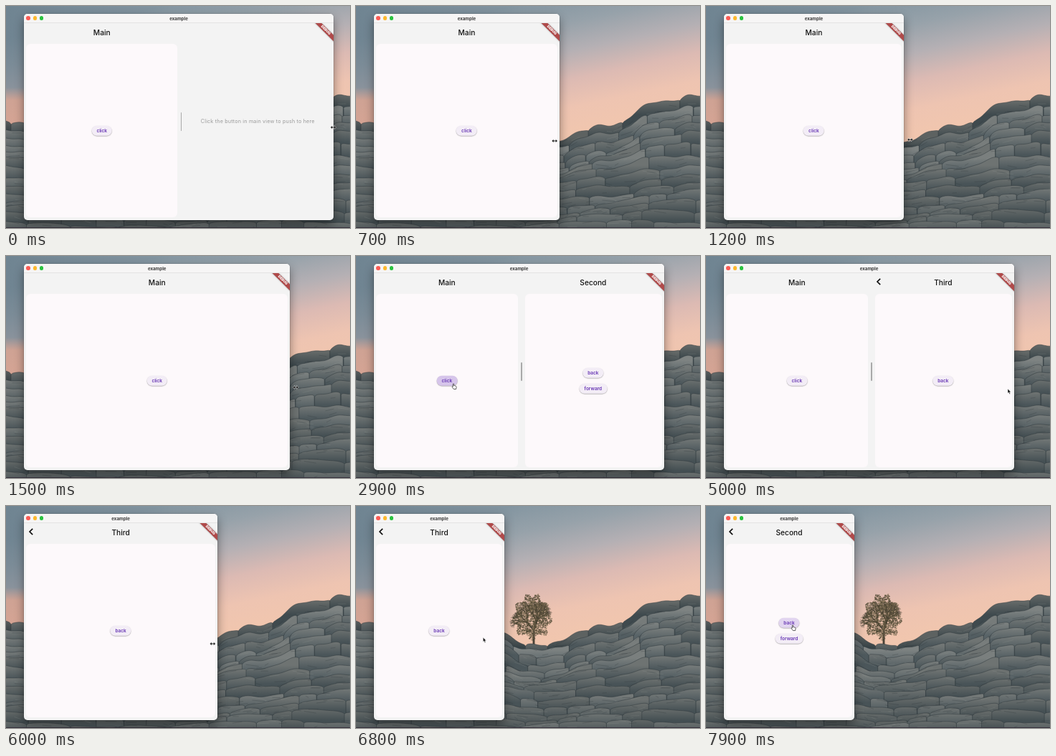
Write an HTML page with a canvas that moves like this. It is 480 px wide and 311 px high and loops after 8000 ms.

```html
<!DOCTYPE html>
<html lang="en">
<head>
<meta charset="utf-8">
<title>Split view</title>
<style>
html, body { margin: 0; width: 100%; height: 100%; overflow: hidden; background: #59646a; }
body { position: relative; font-family: Inter, Roboto, sans-serif; }
[hidden] { display: none !important; }
#scene { position: absolute; left: 0; top: 0; width: 480px; height: 311px; }
#win, #shade { position: absolute; left: 25px; top: 10.5px; height: 289px; border-radius: 5px; }
#win { overflow: hidden; background: #f3f3f3; }
#shade { box-shadow: 0 0 0 .5px rgba(0,0,0,.2), 0 6px 14px rgba(0,0,0,.42); }
#bar {
  position: absolute; left: 0; right: 0; top: 0; height: 12.5px; line-height: 13px;
  background: #f6f5f5; border-bottom: .5px solid #e4e3e3; text-align: center;
  font-size: 6.2px; font-weight: 700; color: #3b3b3b;
}
#bar i { position: absolute; top: 3.7px; width: 5.6px; height: 5.6px; border-radius: 50%; }
.pane { position: absolute; top: 0; bottom: 0; }
.title {
  position: absolute; left: 0; right: 0; top: 19px; line-height: 14px;
  text-align: center; font-size: 10.2px; font-weight: 500; color: #111;
}
.card { position: absolute; left: 3px; right: 3px; top: 42px; bottom: 3.5px; border-radius: 6px; background: #fdf9fb; }
.split #detail .card { left: 4px; }
.chevron { position: absolute; left: 5.6px; top: 20.5px; width: 8px; height: 10px; }
.btn {
  position: absolute; left: 50%; transform: translate(-50%, -50%); height: 14.4px; line-height: 14.4px;
  padding: 0 7px; border-radius: 7.2px; background: #f3edf6; color: #6634b3;
  font-size: 6.5px; font-weight: 600; white-space: nowrap;
  box-shadow: 0 .6px 1.2px rgba(0,0,0,.34);
}
.btn.hot { background: #e2d5f0; }
.btn.down { background: #d6c5ea; }
#hint {
  position: absolute; left: 0; right: 0; top: 145px; line-height: 12px; text-align: center;
  font-size: 7.2px; letter-spacing: .18px; color: #999; white-space: nowrap;
}
#grip { position: absolute; top: 138px; width: 1.7px; height: 26px; margin-left: -.8px; border-radius: 1px; background: #a9a9a9; }
#ribbon { position: absolute; right: 0; top: 13px; width: 28px; height: 28px; overflow: hidden; }
#ribbon b {
  position: absolute; left: -10.6px; top: 7.5px; width: 56px; height: 5.8px;
  line-height: 5.9px; text-align: center; font-size: 4.9px; font-weight: 900; color: #fff;
  background: #b04a4a; box-shadow: 0 0 2px rgba(0,0,0,.5); transform: rotate(45deg);
}
#cursor { position: absolute; left: 0; top: 0; width: 1px; height: 1px; overflow: visible; }
</style>
</head>
<body>
<canvas id="scene" width="480" height="311"></canvas>
<div id="shade"></div>
<div id="win">
  <div id="main" class="pane" style="left:0">
    <div class="title">Main</div>
    <div class="card"></div>
    <div id="click" class="btn" style="top:164px">click</div>
  </div>
  <div id="detail" class="pane" style="right:0">
    <div id="hint">Click the button in main view to push to here</div>
    <div id="page">
      <svg id="chevron" class="chevron" viewBox="0 0 8 10"><path d="M6.2.8 2 5l4.2 4.2" fill="none" stroke="#111" stroke-width="1.7"/></svg>
      <div id="name" class="title"></div>
      <div class="card"></div>
      <div id="back" class="btn">back</div>
      <div id="forward" class="btn" style="top:175px">forward</div>
    </div>
  </div>
  <div id="grip"></div>
  <div id="bar">
    <i style="left:3.4px;background:#fc5b55"></i><i style="left:12.6px;background:#fdb92d"></i><i style="left:21.7px;background:#29c23f"></i>
    example
  </div>
  <div id="ribbon"><b>DEBUG</b></div>
</div>
<svg id="cursor">
  <g id="resize" stroke="#fff" stroke-width=".5"><path d="M-4 0l2.6-2.5v1.7h2.8v-1.7L4 0 1.4 2.5V.8h-2.8v1.7z" fill="#111"/></g>
  <g id="arrow" stroke="#fff" stroke-width=".5"><path d="M0 0v6.3l1.4-1.2 1 2.3 1.2-.5-1-2.2h1.9z" fill="#111"/></g>
  <g id="hand" stroke="#111" stroke-width=".65" stroke-linejoin="round"><path d="M-.7 4V.6q0-.8.7-.8t.7.8v2l1 .1.9.3.9.4q.6.3.6 1L3.6 7.5H.4L-1.7 4.8q-.5-.8.2-1z" fill="#fff"/></g>
</svg>
<script>
const $ = id => document.getElementById(id);

function seeded(s) {
  return () => (s = (s * 16807) % 2147483647) / 2147483647;
}

// Eased progress from 0 to 1 between two times or places.
function ease(t, from, to) {
  const u = Math.min(1, Math.max(0, (t - from) / (to - from)));
  return (1 - Math.cos(Math.PI * u)) / 2;
}

function gradient(g, x0, y0, x1, y1, ...colors) {
  const fill = g.createLinearGradient(x0, y0, x1, y1);
  colors.forEach((color, i) => fill.addColorStop(i / (colors.length - 1), color));
  return fill;
}

// Skyline of the rock: a dip under the tree, a long climb, two domes.
function ridge(x) {
  return 162 + 8 * ease(x, 0, 50) + 25 * ease(x, 180, 245) - 27 * ease(x, 260, 345)
    - 33 * ease(x, 355, 420) - 9 * ease(x, 430, 468) + 1.2 * Math.sin(x / 5);
}

function drawTree(g, rnd) {
  g.strokeStyle = '#4a4236';
  (function branch(x, y, angle, len, depth) {
    const ex = x + Math.cos(angle) * len, ey = y + Math.sin(angle) * len;
    g.lineWidth = .4 + depth * .5;
    g.beginPath();
    g.moveTo(x, y);
    g.lineTo(ex, ey);
    g.stroke();
    if (!depth) return;
    for (const turn of [-.5, 0, .5])
      branch(ex, ey, angle + turn + (rnd() - .5) * .4, len * (.6 + rnd() * .18), depth - 1);
  })(248, 197, -1.57, 23, 5);
  for (let i = 0; i < 1900; i++) {
    const a = rnd() * 6.283, r = Math.sqrt(rnd()) * (1 + .12 * Math.sin(a * 9));
    g.fillStyle = rnd() < .62 ? 'rgba(78,71,53,.75)' : 'rgba(140,122,92,.6)';
    g.fillRect(245 + Math.cos(a) * r * (25 + 4 * Math.sin(a)), 154 + Math.sin(a) * r * 30, 1.5, 1.3);
  }
}

function drawRock(g, rnd) {
  const layers = 14;
  const level = (k, x) => {
    const top = ridge(x), sag = Math.sin(x / 61 + k * .9) * 4 + Math.sin(x / 17 + k * 2) * 1.2;
    return top + (316 - top) * k / layers + sag * Math.min(k, 3) / 3;
  };
  for (let k = 0; k < layers; k++) {
    for (let x = -30 * rnd(); x < 480;) {
      const end = x + 24 + rnd() * 56, top = level(k, (x + end) / 2);
      const tone = Math.round((k ? 112 : 90) + rnd() * 16 - k * 1.2);
      g.beginPath();
      g.moveTo(x, 311);
      for (let px = x; px <= end + 1; px += 2) {
        const bulge = Math.sqrt(Math.max(0, 1 - Math.abs((px - x) / (end - x) * 2 - 1) ** 4));
        g.lineTo(px, level(k, px) + 2.5 - 3.5 * bulge);
      }
      g.lineTo(end + 1, 311);
      g.fillStyle = gradient(g, 0, top - 2, 0, top + 15,
        `rgb(${tone},${tone + 5},${tone + 4})`, `rgb(${tone - 36},${tone - 25},${tone - 21})`);
      g.fill();
      g.lineWidth = .9;
      g.strokeStyle = 'rgba(44,52,56,.5)';
      g.stroke();
      x = end;
    }
  }
  // Short weathered cracks that follow the strata.
  g.lineWidth = .7;
  for (let i = 0; i < 420; i++) {
    const x = rnd() * 480, k = .3 + rnd() * layers, len = 4 + rnd() * 14;
    g.strokeStyle = i % 3 ? 'rgba(42,51,55,.35)' : 'rgba(150,155,150,.28)';
    g.beginPath();
    g.moveTo(x, level(k, x));
    g.lineTo(x + len, level(k, x + len) + (rnd() - .4) * 5);
    g.stroke();
  }
}

function drawScene() {
  const g = $('scene').getContext('2d'), rnd = seeded(77);
  g.fillStyle = gradient(g, 220, 0, 260, 190, '#8496a1', '#97a2aa', '#b5b0b4', '#dcbab3', '#eec4b1', '#f1c6ae');
  g.fillRect(0, 0, 480, 311);
  g.fillStyle = gradient(g, 0, 0, 230, 0, 'rgba(80,105,122,.4)', 'rgba(80,105,122,0)');
  g.fillRect(0, 0, 480, 311);
  g.fillStyle = gradient(g, 0, 114, 0, 132, 'rgba(232,168,144,0)', 'rgba(232,168,144,.7)');
  g.fillRect(0, 114, 60, 70);
  drawTree(g, rnd);
  drawRock(g, rnd);
  g.fillStyle = '#352f3b';
  g.fillRect(0, 310, 480, 1);
}

const LOOP = 8000, STEP = 100;
const within = (t, a, b) => t >= a && t < b;

// Right side of the window: dragged in, out, and in again.
const edge = t => 457 - 218 * ease(t, 0, 1000) + 191 * ease(t, 1000, 1690) - 223 * ease(t, 5300, 6535);

// The pointer slightly leads the edge it drags, and leaves it to press buttons.
const pointerX = t => edge(t + 25) - 294 * ease(t, 2000, 2500) + 195 * ease(t, 3100, 3800)
  + 90 * ease(t, 4300, 5000) + 9 * ease(t, 5000, 5300) - 86 * ease(t, 6600, 7100);
const pointerY = t => 170 + 19 * ease(t, 0, 700) - 5 * ease(t, 1000, 1500) - 5 * ease(t, 2000, 2500)
  + 7 * ease(t, 3100, 3800) + 7 * ease(t, 5000, 5300) - 26 * ease(t, 6600, 7100);

function render(now) {
  const t = Math.floor((now % LOOP) / STEP) * STEP;
  const right = edge(t), width = right - 25;
  const split = right > 400, grip = width * .508;
  const pageName = t < 2700 ? '' : within(t, 4100, 7400) ? 'Third' : 'Second';
  const second = pageName === 'Second';

  $('win').style.width = $('shade').style.width = width + 'px';
  $('win').classList.toggle('split', split);
  $('main').style.width = (split ? grip - 2 : width) + 'px';
  $('detail').style.left = (split ? grip + 1 : 0) + 'px';
  $('grip').style.left = grip + 'px';
  $('grip').hidden = !split;
  $('main').hidden = !split && !!pageName;
  $('detail').hidden = !split && !pageName;
  $('hint').hidden = !!pageName;
  $('page').hidden = !pageName;
  $('name').textContent = pageName;
  $('chevron').style.display = split && second ? 'none' : '';
  $('forward').hidden = !second;
  $('back').style.top = (second ? 153 : 164) + 'px';

  const x = pointerX(t), y = pointerY(t);
  const mainX = 25 + (split ? grip - 2 : width) / 2;
  const pageX = (right + 25 + (split ? grip + 1 : 0)) / 2;
  const pressed = within(t, 2600, 3000) || within(t, 4000, 4100) || within(t, 7300, 7400);
  let over = false;
  const hover = (id, cx, cy, half, shown) => {
    const hot = shown && Math.abs(x - cx) < half && Math.abs(y - cy) < 7.2;
    $(id).classList.toggle('hot', hot);
    $(id).classList.toggle('down', hot && pressed);
    over = over || hot;
  };
  hover('click', mainX, 174, 14.5, split || !pageName);
  hover('back', pageX, second ? 163 : 174, 15, !!pageName);
  hover('forward', pageX, 185, 19.5, second);

  const resizing = t < 2000 || within(t, 5200, 6600);
  const kind = resizing ? 'resize' : over ? 'hand' : 'arrow';
  for (const id of ['resize', 'arrow', 'hand']) $(id).style.display = id === kind ? '' : 'none';
  $('cursor').style.transform = `translate(${x}px, ${y}px)`;
}

drawScene();
const start = performance.now();
function tick() {
  render(performance.now() - start);
  requestAnimationFrame(tick);
}
tick();
</script>
</body>
</html>
```
